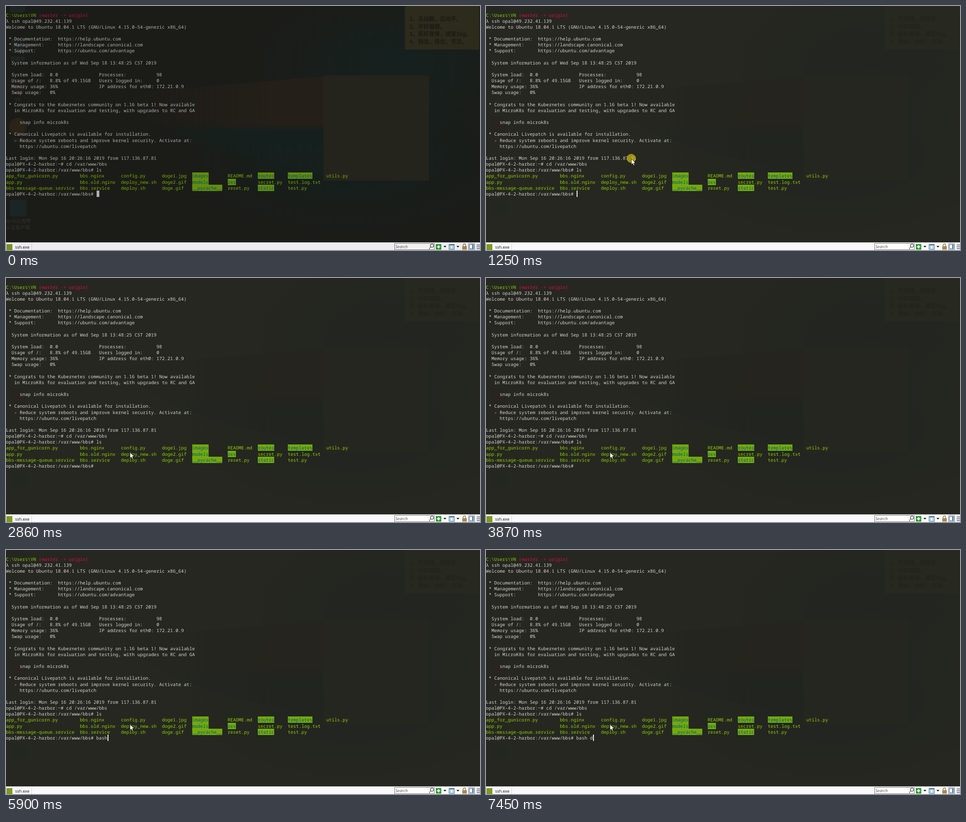
Animation, 1041 px wide and 538 px high, one loop 8000 ms. Source, as an HTML page:

```html
<!DOCTYPE html>
<html lang="en">
<head>
<meta charset="utf-8">
<title>Terminal</title>
<style>
html, body { margin: 0; width: 100%; height: 100%; overflow: hidden; background: #272822; }
#stage { position: relative; width: 1041px; height: 538px; overflow: hidden; background: #262721; }
#stage.dim { background: #1b1c18; }
#stage > * { position: absolute; }

/* desktop seen through the window */
#desk { inset: 0; opacity: .25; }
.dim #desk { opacity: 1; }
#desk > * { position: absolute; }
#glow {
  inset: 0;
  background:
    radial-gradient(300px 170px at 850px 130px, #15211f 0%, #15211f00 100%),
    radial-gradient(360px 170px at 760px 330px, #131f1e 0%, #131f1e00 100%);
}
#beam {
  left: 230px; top: 150px; width: 467px; height: 232px;
  background: linear-gradient(#241f19 0 48%, #15201e 54%, #171f1c);
  clip-path: polygon(0 20%, 100% 2%, 100% 98%, 35% 62%);
  mask-image: linear-gradient(90deg, #0000, #000 75%);
}
#pane { left: 697px; top: 153px; width: 232px; height: 232px; background: #24241c; }
#note {
  left: 876px; top: 0; width: 153px; height: 76px; padding: 20px 0 0 10px;
  background: #2d2b1c; color: #1b1b14; white-space: pre;
  font: bold 12px/16.5px "Noto Sans CJK SC", "Noto Sans CJK", sans-serif;
}
.label {
  left: -4px; width: 60px; text-align: center; color: #31322e; white-space: pre;
  font: 10.5px/13.5px "Noto Sans CJK SC", "Noto Sans CJK", sans-serif;
}
.icon { border-radius: 3px; }

/* terminal */
#term { inset: 0; }
.dim #term { opacity: .8; }
#term pre {
  margin: 0; position: absolute; left: 0; top: 13.6px; color: #d4d4d0;
  font: 10.033px/13.14px "Noto Sans Mono", "DejaVu Sans Mono", monospace;
  text-rendering: geometricPrecision; font-variant-ligatures: none;
}
.g { color: #8dd006; }
.r { color: #e8064a; }
#term i { font-style: normal; color: #01549e; background: #74aa04; }
#caret { position: absolute; top: 407px; height: 14px; width: 2px; background: #f0f0f0; }
.dim #caret { width: 6.4px; background: #d6d6d6; }

/* status bar */
#bar { left: 0; top: 521px; width: 1041px; height: 17px; background: #f9f9fd; }
.dim #bar { filter: brightness(.95); }
#bar svg { position: absolute; left: 0; top: 0; }
#bar text { font-family: "Open Sans", "Noto Sans", sans-serif; }

#click { left: 309px; top: 326px; width: 20px; height: 20px; border-radius: 50%; background: #c4b30cc0; }
#mouse { left: 0; top: 0; overflow: visible; }
</style>
</head>
<body>
<div id="stage">
  <div id="desk">
    <div id="glow"></div>
    <div id="beam"></div>
    <div id="pane"></div>
    <div id="note">1、先动脑，后动手。
2、学好编程。
3、练好身体，减重5kg。
4、别怂，自信，专注。</div>
    <div class="icon" style="left:8px;top:0;width:34px;height:14px;background:#1e2423"></div>
    <div class="icon" style="left:12px;top:72px;width:28px;height:32px;background:#1e2322"></div>
    <div class="label" style="top:109px">回收站</div>
    <div class="icon" style="left:9px;top:162px;width:32px;height:32px;border-radius:50%;background:#201f1b"></div>
    <div class="label" style="top:199px">VV</div>
    <div class="icon" style="left:7px;top:247px;width:38px;height:38px;border-radius:50%;background:#2a2318"></div>
    <div class="label" style="top:288px">Quill</div>
    <div class="icon" style="left:8px;top:427px;width:37px;height:37px;background:#1b2523"></div>
    <div class="label" style="top:467px">Xe.NUL宽带
认证客户端</div>
  </div>

  <div id="term">
<pre><span class="g">C:\Users\VN</span> <span class="r">(master -&gt; origin)</span>
λ ssh opal@49.232.41.139
Welcome to Ubuntu 18.04.1 LTS (GNU/Linux 4.15.0-54-generic x86_64)

 * Documentation:  https://help.ubuntu.com
 * Management:     https://landscape.canonical.com
 * Support:        https://ubuntu.com/advantage

  System information as of Wed Sep 18 13:48:25 CST 2019

  System load:  0.0               Processes:           98
  Usage of /:   8.8% of 49.15GB   Users logged in:     0
  Memory usage: 36%               IP address for eth0: 172.21.0.9
  Swap usage:   0%

 * Congrats to the Kubernetes community on 1.16 beta 1! Now available
   in MicroK8s for evaluation and testing, with upgrades to RC and GA

     snap info microk8s

 * Canonical Livepatch is available for installation.
   - Reduce system reboots and improve kernel security. Activate at:
     https://ubuntu.com/livepatch

Last login: Mon Sep 16 20:26:16 2019 from 117.136.87.81
opal@PX-4-2-harbor:~# cd /var/www/bbs
opal@PX-4-2-harbor:/var/www/bbs# ls
<span class="g" id="files"></span>
opal@PX-4-2-harbor:/var/www/bbs# <span id="typed"></span></pre>
    <div id="caret"></div>
  </div>

  <div id="bar">
    <svg width="1041" height="17" viewBox="0 521 1041 17">
      <path d="M0 521.5H1041" stroke="#c4c4c8"/>
      <path d="M56.5 523V538" stroke="#d4d4da"/>
      <path d="M1 525h13v13H1z" fill="#7d9a24"/>
      <text x="20" y="535" font-size="9.2" fill="#111">ssh.exe</text>
      <path d="M853.5 523.5h87v14h-87z" fill="#fff" stroke="#777"/>
      <text x="855" y="534" font-size="9.2" font-style="italic" fill="#555">Search</text>
      <g fill="none" stroke="#333" stroke-width="1.2"><circle cx="935.5" cy="528.5" r="3.5"/><path d="M933 531l-4 5"/></g>
      <path d="M944 525h12v12h-12z" fill="#2f9a35"/>
      <path d="M946.5 531h7M950 527.5v7" stroke="#fff" stroke-width="2.4"/>
      <path d="M961 529h6l-3 3.5zM989.5 529h6l-3 3.5z" fill="#111"/>
      <path d="M973 525.5h11.5v11H973z" fill="#b9d8ef" stroke="#4d7391"/>
      <path d="M973 526.5h11.5" stroke="#4d7391" stroke-width="2"/>
      <path d="M978.8 529v6" stroke="#fff" stroke-width="2"/>
      <path d="M1004 530v-3a2.7 2.5 0 0 1 5.4 0v3" fill="none" stroke="#8c7650" stroke-width="1.4"/>
      <path d="M1002 529.5h10v7.5h-10z" fill="#b08a4b"/>
      <path d="M1015.5 523.5h14v14h-14z" fill="#cfe0f0" stroke="#8aa5c0"/>
      <path d="M1017.5 526h10v9h-10z" fill="#fff" stroke="#4c5c6c"/>
      <path d="M1025 526v9" stroke="#4c5c6c" stroke-width="2"/>
      <path d="M1033.5 527h8M1033.5 531h8M1033.5 535h8" stroke="#3e5878" stroke-width="1.6"/>
    </svg>
  </div>

  <div id="click"></div>
  <svg id="mouse" width="10" height="16"><path d="M.4.5V13.2L3.3 10.5 5.3 15 7.3 14.1 5.3 9.7H9.2Z" fill="#fff" stroke="#111" stroke-width=".7"/></svg>
</div>

<script>
const LOOP = 8000, CELL = 6.02, PROMPT = 33;
const $ = id => document.getElementById(id);

// directory listing: names without a dot are directories
const widths = [27, 15, 15, 11, 13, 11, 11, 14, 0];
$('files').innerHTML = [
  'app_for_gunicorn.py bbs.nginx config.py doge1.jpg images README.md routes templates utils.py',
  'app.py bbs.old.nginx deploy_new.sh doge2.gif models res secret.py test.log.txt',
  'bbs-message-queue.service bbs.service deploy.sh doge.gif __pycache__ reset.py static test.py'
].map(row => row.split(' ').map((name, i) =>
  (name.includes('.') ? name : `<i>${name}</i>`) + ' '.repeat(Math.max(0, widths[i] - name.length))
).join('')).join('\n');

const command = 'bash d';
const keys = [5520, 5590, 5750, 5900, 6820, 7450];
const blinks = [1760, 2310, 2860, 3410, 3870, 4420, 4970, 5520, 6440, 6820, 7370, 7450];
const passed = (times, t) => times.filter(x => x <= t).length;

const clamp = p => Math.min(1, Math.max(0, p));
const mix = (a, b, p) => a.map((v, i) => v + (b[i] - v) * p);
const entry = [825, 525], rest = [319, 336.5], end = [272, 384];

function mouseAt(t) {
  if (t < 1520) {
    const p = clamp(Math.floor((t - 370) / 76) / 5);
    return mix(entry, rest, 1 - (1 - p) ** 2);
  }
  return mix(rest, end, clamp((Math.floor((t - 1520) / 80) + 1) / 4));
}

function draw(t) {
  const typed = passed(keys, t), focused = t >= 1250;
  $('stage').className = focused ? '' : 'dim';
  $('typed').textContent = command.slice(0, typed);
  $('caret').style.left = (PROMPT + typed) * CELL + (focused ? .4 : 0) + 'px';
  $('caret').hidden = passed(blinks, t) % 2 === 1;
  $('click').hidden = t < 1250 || t >= 1330;
  const [x, y] = mouseAt(t);
  $('mouse').style.transform = `translate(${x}px, ${y}px)`;
  $('mouse').style.visibility = t < 370 ? 'hidden' : 'visible';
}

let start;
function tick(now) {
  start ??= now;
  draw((now - start) % LOOP);
  requestAnimationFrame(tick);
}
draw(0);
requestAnimationFrame(tick);
</script>
</body>
</html>
```
